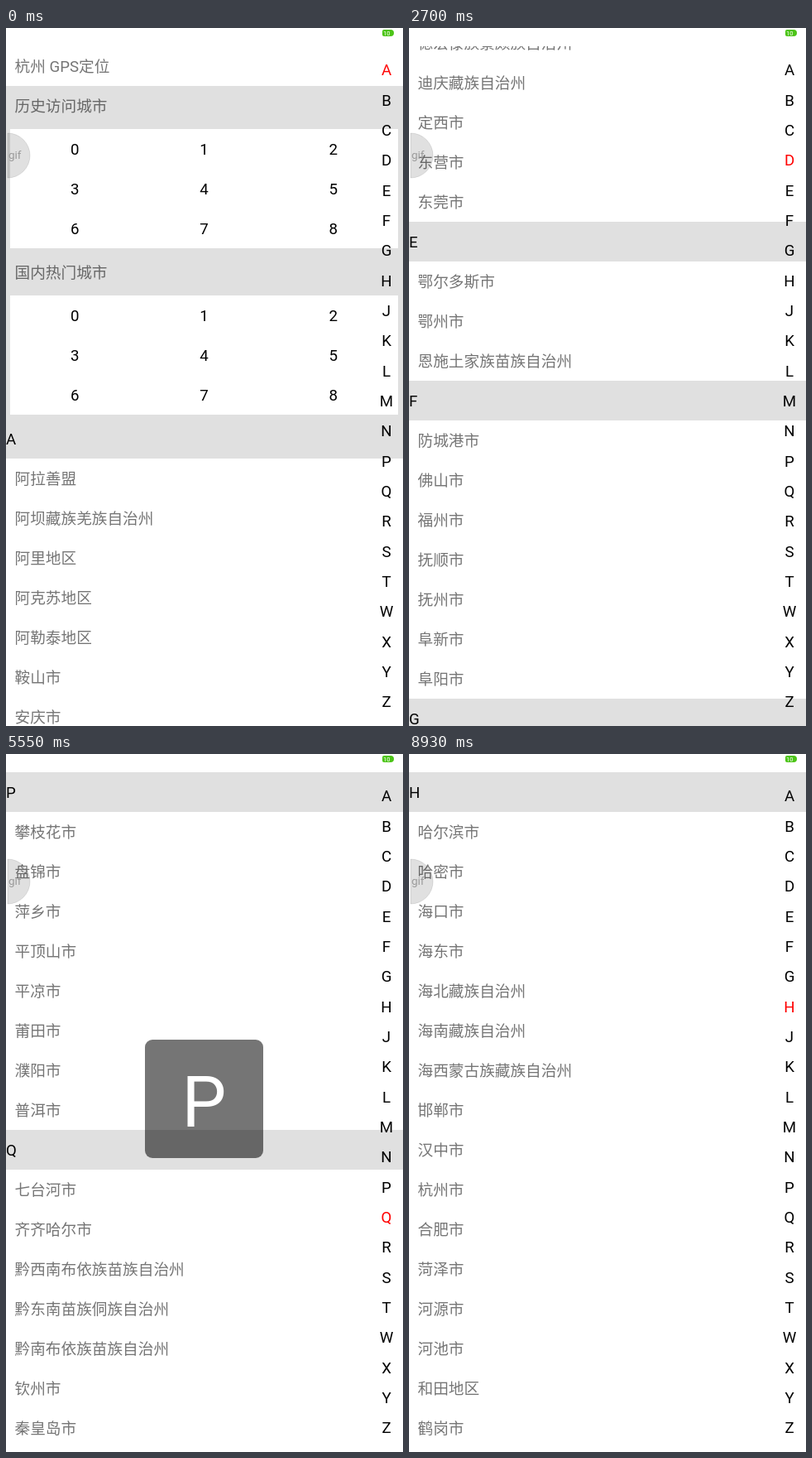
An HTML page with a canvas for the animation above (9620 ms loop, 480 px wide and 843 px high).

```html
<!DOCTYPE html>
<html lang="zh-CN">
<head>
<meta charset="utf-8">
<title>城市列表</title>
<style>
  html, body { margin: 0; width: 100%; height: 100%; overflow: hidden; background: #fff; }
  canvas { display: block; width: 480px; height: 843px; }
</style>
</head>
<body>
<canvas id="stage"></canvas>
<script>
const W = 480, H = 843, LOOP = 9620;
const TOP = 22, ROW = 48, LIST_TOP = 472;
const GREY = '#e0e0e0', MUTED = 'rgba(0,0,0,.54)';
const FAMILY = 'Roboto, "Noto Sans CJK SC", "Noto Sans CJK", sans-serif';
const INDEX = 'ABCDEFGHJKLMNPQRSTWXYZ';

// "~" stands for 自治州; plain names get 市.
const CITIES = {
  A: '阿拉善盟 阿坝藏族羌族~ 阿里地区 阿克苏地区 阿勒泰地区 鞍山 安庆 安阳 安顺 安康',
  B: '巴彦淖尔 巴中 巴音郭楞蒙古~ 白山 白城 白银 百色 蚌埠 包头 保定 保山 宝鸡 北京 北海 本溪 毕节 滨州 亳州 博尔塔拉蒙古~',
  C: '沧州 长治 长春 长沙 常州 常德 昌吉回族~ 昌都 朝阳 潮州 郴州 成都 承德 赤峰 池州 滁州 崇左 楚雄彝族~ 重庆',
  D: '大同 大连 大庆 大兴安岭地区 大理白族~ 丹东 达州 德州 德阳 德宏傣族景颇族~ 迪庆藏族~ 定西 东营 东莞',
  E: '鄂尔多斯 鄂州 恩施土家族苗族~',
  F: '防城港 佛山 福州 抚顺 抚州 阜新 阜阳',
  G: '甘孜藏族~ 甘南藏族~ 赣州 固原 广州 广元 广安 桂林 贵港 贵阳 果洛藏族~',
  H: '哈尔滨 哈密 海口 海东 海北藏族~ 海南藏族~ 海西蒙古族藏族~ 邯郸 汉中 杭州 合肥 菏泽 河源 河池 和田地区 鹤岗 鹤壁 贺州 黑河 衡水 衡阳 红河哈尼族彝族~ 呼和浩特 呼伦贝尔 湖州 葫芦岛 怀化 淮安 淮北 淮南 黄山 黄冈 黄石 黄南藏族~ 惠州',
  J: '鸡西 吉林 吉安 济南 济宁 佳木斯 嘉兴 嘉峪关 江门 焦作 揭阳 锦州 金华 金昌 晋中 晋城 景德镇 荆门 荆州 九江 酒泉',
  K: '开封 喀什地区 克拉玛依 克孜勒苏柯尔克孜~ 昆明',
  L: '拉萨 来宾 莱芜 兰州 廊坊 乐山 丽江 丽水 连云港 凉山彝族~ 辽阳 辽源 聊城 林芝 临沧 临汾 临夏回族~ 临沂 柳州 六安 六盘水 龙岩 陇南 娄底 吕梁 洛阳 泸州 漯河',
  M: '马鞍山 茂名 梅州 眉山 绵阳 牡丹江',
  N: '南京 南通 南昌 南平 南阳 南宁 南充 内江 那曲地区 宁波 宁德 怒江傈僳族~',
  P: '攀枝花 盘锦 萍乡 平顶山 平凉 莆田 濮阳 普洱',
  Q: '七台河 齐齐哈尔 黔西南布依族苗族~ 黔东南苗族侗族~ 黔南布依族苗族~ 钦州 秦皇岛 青岛 清远 庆阳 曲靖 衢州 泉州',
  R: '日喀则 日照',
  S: '三门峡 三明 三亚'
};

const fullName = s =>
  s.endsWith('~') ? s.replace('~', '自治州') : /(盟|地区)$/.test(s) ? s : s + '市';

const rows = [], sectionTop = {};
for (const [letter, names] of Object.entries(CITIES)) {
  sectionTop[letter] = LIST_TOP + rows.length * ROW;
  rows.push({ letter, text: letter, header: true });
  for (const name of names.split(' ')) rows.push({ letter, text: fullName(name) });
}

// Timeline: the screen only changes at discrete steps.
const steps = [{ t: 0, y: 0, picked: '' }];
const last = () => steps[steps.length - 1];
const stepTime = (start, end, i, n) => start + (n > 1 ? (end - start) * i / (n - 1) : 0);

function fling(start, end, n, to, power) {
  const from = last().y;
  for (let i = 0; i < n; i++) {
    const eased = 1 - (1 - (i + 1) / n) ** power;
    steps.push({ t: stepTime(start, end, i, n), y: Math.round(from + (to - from) * eased), picked: '' });
  }
}
function drag(start, end, letters) {
  [...letters].forEach((picked, i) => steps.push({
    t: stepTime(start, end, i, letters.length),
    y: picked === 'A' ? 0 : sectionTop[picked] - TOP,
    picked
  }));
}
const settle = (t, picked = last().picked) => steps.push({ ...last(), t, picked });

fling(810, 1580, 9, 829, 1.5);
fling(1650, 1740, 2, 852, 1.5);
fling(1840, 2410, 7, sectionTop.E - 300, 2);
fling(2560, 2700, 3, sectionTop.E - 234, 2);
fling(3030, 3460, 6, sectionTop.H + 6, 1);
fling(3550, 3930, 6, sectionTop.J - 500, 2);
fling(4040, 4120, 2, sectionTop.J - 440, 1.5);
fling(4270, 4270, 1, sectionTop.J - 432, 1);
drag(4530, 4530, 'K');
drag(4730, 5130, 'LMNPQ');
settle(5310);
drag(5550, 5550, 'P');
drag(5650, 6010, 'NMLKJH');
drag(6160, 6300, 'GFE');
drag(6530, 7370, 'DCBABCDEFG');
drag(7460, 7460, 'H');
drag(7560, 8080, 'GFEDCD');
settle(8180);
drag(8520, 8830, 'EFGH');
settle(8930, '');

// The index highlight trails the list by one step.
const sectionAt = y => rows[Math.max(0, Math.floor((y + TOP - LIST_TOP) / ROW))].letter;
steps.forEach((s, i) => { s.active = sectionAt(steps[Math.max(0, i - 1)].y); });

const canvas = document.getElementById('stage');
const ctx = canvas.getContext('2d');
const dpr = window.devicePixelRatio || 1;
canvas.width = W * dpr;
canvas.height = H * dpr;
ctx.scale(dpr, dpr);

function rect(x, y, w, h, color, radius = 0) {
  ctx.fillStyle = color;
  ctx.beginPath();
  ctx.roundRect(x, y, w, h, radius);
  ctx.fill();
}
function label(text, x, baseline, color, align = 'left', size = 18.67) {
  ctx.font = `${size}px ${FAMILY}`;
  ctx.textAlign = align;
  ctx.fillStyle = color;
  ctx.fillText(text, x, baseline);
}
const cityLabel = (text, center) => label(text, 10.5, center + 7.4, MUTED);

function drawGrid(title, top) {
  cityLabel(title, top + 24);
  rect(5, top + 52, 469, 144, '#fff');
  for (let i = 0; i < 9; i++) {
    const x = 83.2 + (i % 3) * 156.3;
    label(i, x, top + 82.7 + Math.floor(i / 3) * ROW, '#000', 'center');
  }
}

function drawList(scroll) {
  ctx.save();
  ctx.beginPath();
  ctx.rect(0, TOP, W, H - TOP);
  ctx.clip();
  ctx.translate(0, -scroll);
  if (scroll < LIST_TOP) {
    cityLabel('杭州 GPS定位', 46);
    rect(0, 70, W, LIST_TOP - 70, GREY);
    drawGrid('历史访问城市', 70);
    drawGrid('国内热门城市', 271);
  }
  rows.forEach((row, i) => {
    const y = LIST_TOP + i * ROW;
    if (y + ROW < scroll || y > scroll + H) return;
    if (row.header) {
      rect(0, y, W, ROW, GREY);
      label(row.text, 0, y + 30.7, '#000');
    } else {
      cityLabel(row.text, y + 24);
    }
  });
  ctx.restore();
}

function drawBadge() {
  ctx.beginPath();
  ctx.arc(2, 154, 27, -Math.PI / 2, Math.PI / 2);
  ctx.closePath();
  ctx.fillStyle = 'rgba(0,0,0,.12)';
  ctx.fill();
  ctx.strokeStyle = 'rgba(0,0,0,.1)';
  ctx.lineWidth = 1;
  ctx.stroke();
  label('gif', 3, 157.5, '#999', 'left', 13.5);
}

function drawBattery() {
  rect(455, 2, 14, 8, '#4cc417', [2, 4, 4, 2]);
  label('10', 456, 9, '#fff', 'left', 7.5);
}

function draw({ y, active, picked }) {
  rect(0, 0, W, H, '#fff');
  drawList(y);
  [...INDEX].forEach((letter, i) =>
    label(letter, 460, 57.4 + i * 36.33, letter === active ? '#f00' : '#000', 'center'));
  if (picked) {
    rect(168, 345, 143, 143, MUTED, 9);
    label(picked, 239.5, 450, '#fff', 'center', 85.3);
  }
  drawBadge();
  drawBattery();
}

function tick() {
  const t = performance.now() % LOOP;
  draw(steps.findLast(s => s.t <= t));
  requestAnimationFrame(tick);
}
tick();
</script>
</body>
</html>
```
